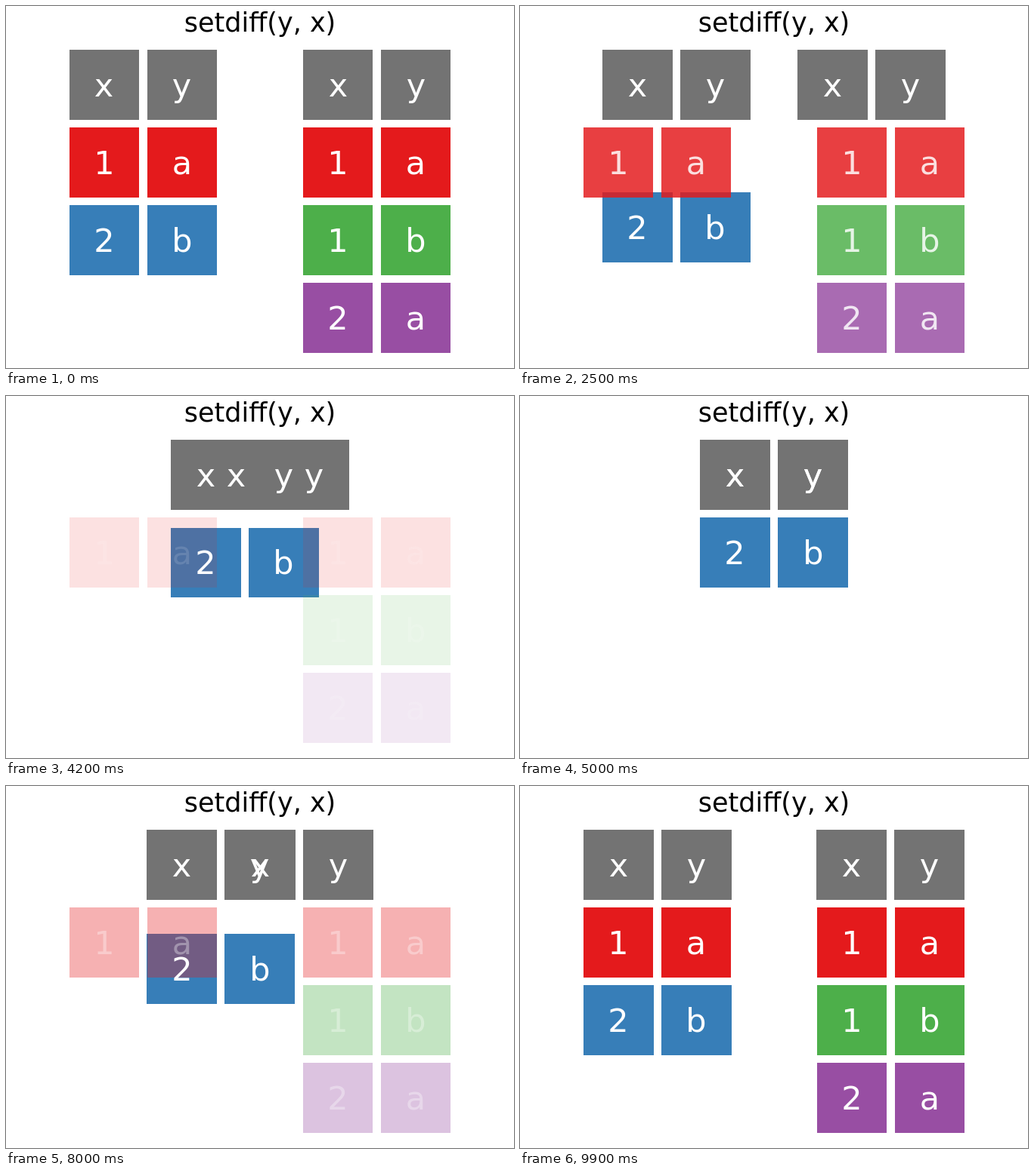
Recreate the animation shown at these times as an HTML page. Size 672 px wide and 480 px high, loop 10000 ms.

```html
<!DOCTYPE html>
<html lang="en">
<head>
<meta charset="utf-8">
<title>setdiff(y, x)</title>
<style>
  html, body { margin: 0; width: 100%; height: 100%; overflow: hidden; background: #fff; }
  svg { display: block; width: 672px; height: 480px; }
  text { font-family: "DejaVu Sans", sans-serif; text-anchor: middle; }
  #cells text { font-size: 43px; fill: #fff; }
  #title { font-size: 35px; }
</style>
</head>
<body>
<svg viewBox="0 0 672 480">
  <text id="title" x="336" y="34">setdiff(y, x)</text>
  <g id="cells"><g id="tiles" shape-rendering="crispEdges"></g><g id="labels"></g></g>
</svg>
<script>
const LOOP = 10000, STEP = 100;
const UNIT = 103.01, HALF = 0.45 * UNIT;
const GREY = '#737373', RED = '#e41a1c', BLUE = '#377eb8', GREEN = '#4daf4a', PURPLE = '#984ea3';

// Half advance widths, used to snap labels to whole pixels
const HALF_ADVANCE = { x: 12.5, y: 12.5, a: 13, b: 14, 1: 14, 2: 14 };

// [colour, labels, column, row, column shift, row shift, fades]
const ROWS = [
  [BLUE, '2b', -2, 2, 1.5, -1, false],
  [GREY, 'xy', -2, 0, 1.5, 0, false],
  [GREY, 'xy', 1, 0, -1.5, 0, false],
  [RED, '1a', -2, 1, 0, 0, true],
  [RED, '1a', 1, 1, 0, 0, true],
  [GREEN, '1b', 1, 2, 0, 0, true],
  [PURPLE, '2a', 1, 3, 0, 0, true]
];

function add(parent, name, attrs) {
  const el = document.createElementNS('http://www.w3.org/2000/svg', name);
  set(el, attrs);
  return document.getElementById(parent).appendChild(el);
}

function set(el, attrs) {
  for (const key in attrs) el.setAttribute(key, attrs[key]);
}

const cells = ROWS.flatMap(([fill, chars, col, row, dx, dy, fades]) =>
  [...chars].map((char, i) => {
    const tile = add('tiles', 'rect', { fill });
    const label = add('labels', 'text', {});
    label.textContent = char;
    return { tile, label, char, col: col + i, row, dx, dy, fades };
  }));

const sine = p => (1 - Math.cos(Math.PI * Math.min(1, Math.max(0, p)))) / 2;
const progress = ms => sine((ms - 1600) / 3400) - sine((ms - 6700) / 3300);

function place(cell, p) {
  const cx = 336 + (cell.col + cell.dx * p) * UNIT;
  const cy = 480 + (cell.row + cell.dy * p - 3.645) * UNIT;
  const left = Math.round(cx - HALF), top = Math.round(cy - HALF);
  const half = HALF_ADVANCE[cell.char];
  const opacity = cell.fades ? 1 - p : 1;
  set(cell.tile, {
    x: left, y: top, opacity,
    width: Math.round(cx + HALF) - left,
    height: Math.round(cy + HALF) - top
  });
  set(cell.label, { x: Math.round(cx - half) + half, y: Math.round(cy + 15.5), opacity });
}

const start = performance.now();

function draw() {
  const ms = (performance.now() - start) % LOOP;
  const p = progress(Math.floor(ms / STEP) * STEP);
  cells.forEach(cell => place(cell, p));
  requestAnimationFrame(draw);
}
draw();
</script>
</body>
</html>
```
